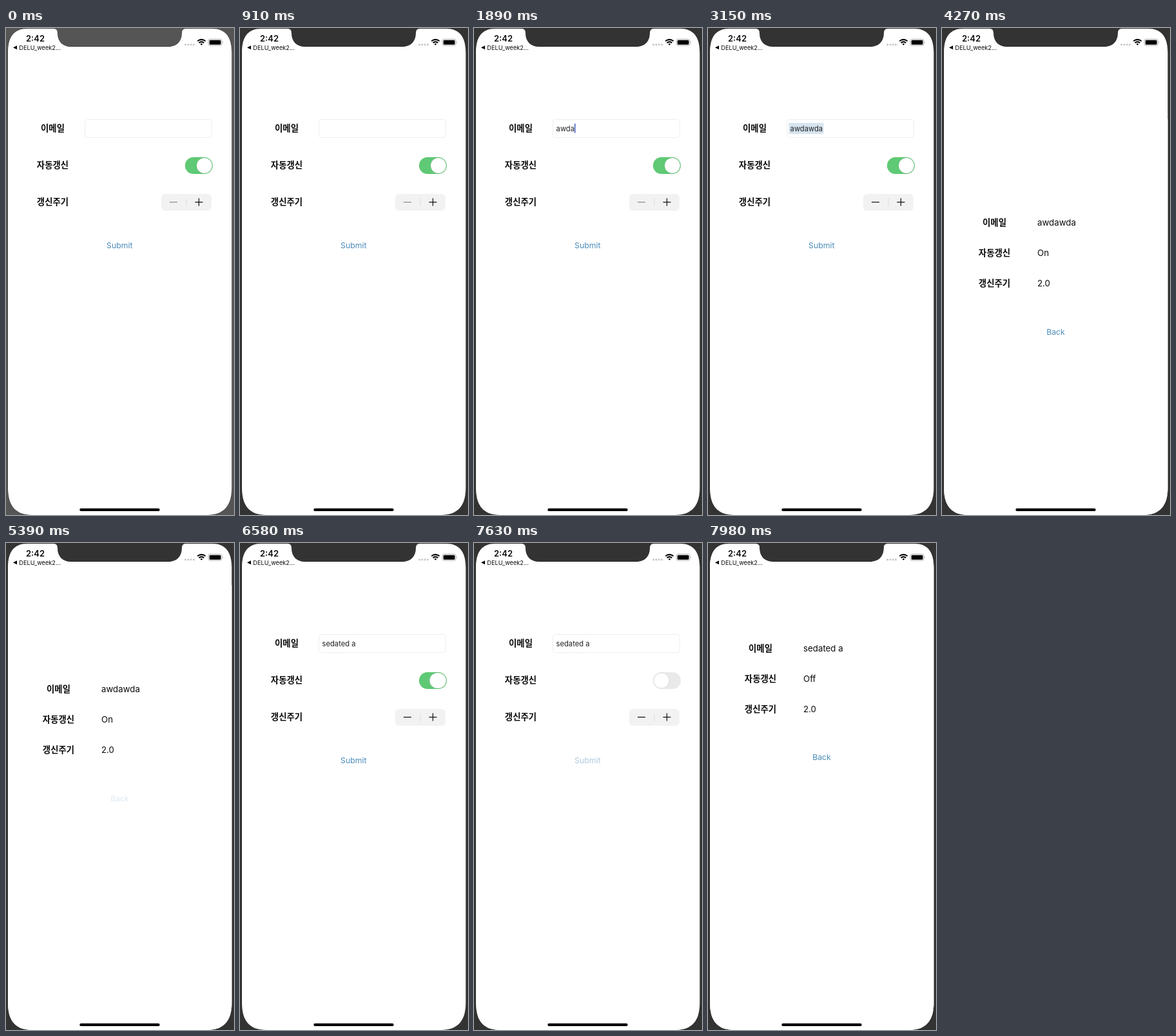
An HTML page that plays this animation: 354 px wide and 754 px high, repeating every 8 s.

```html
<!DOCTYPE html>
<html lang="ko">
<head>
<meta charset="utf-8">
<title>Settings form</title>
<style>
html, body { margin: 0; width: 100%; height: 100%; overflow: hidden; }
svg { display: block; width: 354px; height: 754px; }
text { font-family: Inter, Roboto, sans-serif; fill: #0c0c0c; }
.label { font: 700 13.4px "Noto Sans CJK KR", "Noto Sans CJK", "Noto Sans CJK JP", sans-serif; text-anchor: middle; }
.value { font-size: 13.3px; }
.field { font-size: 11.2px; fill: #222; }
.button { font-size: 12.3px; fill: #4c8cba; text-anchor: middle; }
.time { font-size: 13px; font-weight: 600; text-anchor: middle; }
.back-app { font-size: 9.2px; }
.sign { stroke: #111; stroke-width: 1.2; fill: none; }
</style>
</head>
<body>
<svg viewBox="0 0 354 754">
  <defs>
    <path id="screen" d="M3 38C3 14 12 1 33 1H74Q80 1 80 8C80 21 88 29 101 29H252C265 29 273 21 273 8Q273 1 279 1H320C341 1 350.5 14 350.5 38V712C350.5 740 338 754 312 754H41C15 754 3 740 3 712Z"/>
    <clipPath id="clip"><use href="#screen"/></clipPath>
  </defs>
  <rect id="desk" width="354" height="754"/>
  <use href="#screen" fill="#fff" stroke="#2b2b2b" stroke-width="1" paint-order="stroke"/>

  <g clip-path="url(#clip)">
    <g id="form">
      <text class="label" x="72.5" y="160">이메일</text>
      <text class="label" x="72.5" y="217">자동갱신</text>
      <text class="label" x="72.5" y="274">갱신주기</text>

      <rect x="122.5" y="141.5" width="197" height="28" rx="4" fill="#fff" stroke="#eee"/>
      <rect id="mark" x="125.5" y="147" width="54" height="17" fill="#d6e4ef"/>
      <text id="entry" class="field" x="127.6" y="159.8"></text>
      <rect id="caret" y="148" width="1.5" height="14.5" fill="#3f60c4"/>

      <rect id="track" x="278" y="200" width="43" height="26" rx="13"/>
      <rect id="knob" y="201" height="24" rx="12" fill="#fff" stroke="#000" stroke-opacity=".1"/>

      <rect x="241" y="257" width="78" height="26" rx="6" fill="#f2f2f3"/>
      <path id="press" d="M280 257H313Q319 257 319 263V277Q319 283 313 283H280Z" fill="#d4d4d7"/>
      <path d="M280 264V276" stroke="#dcdcdd"/>
      <path id="minus" class="sign" d="M254 269.6H266"/>
      <path class="sign" d="M293.5 269.6H305.5M299.5 263.6V275.6"/>
      <text id="submit" class="button" x="176.3" y="341">Submit</text>
    </g>

    <g id="modal">
      <rect width="354" height="760" fill="#fff"/>
      <text class="label" x="81.5" y="165.4">이메일</text>
      <text class="label" x="81.5" y="212.4">자동갱신</text>
      <text class="label" x="81.5" y="259.4">갱신주기</text>
      <text id="email" class="value" x="148" y="165.4"></text>
      <text id="auto" class="value" x="148" y="212.4"></text>
      <text class="value" x="148" y="259.4">2.0</text>
      <text id="back" class="button" x="176.5" y="334.2">Back</text>
    </g>
  </g>

  <text class="time" x="45.5" y="21">2:42</text>
  <path d="M11 30.3L17 27.3V33.3Z"/>
  <text class="back-app" x="20.3" y="33.5">DELU_week2...</text>
  <path d="M278.6 25.7H292" stroke="#c4c4c6" stroke-width="3" stroke-linecap="round" stroke-dasharray="0 4.3"/>
  <g fill="none" stroke="#000" stroke-width="2">
    <path d="M297.3 20.3Q303.5 15.4 309.7 20.3M299.6 23Q303.5 19.8 307.4 23"/>
    <path d="M303.5 26.8L301.6 24.7Q303.5 23.4 305.4 24.7Z" fill="#000" stroke="none"/>
  </g>
  <rect x="314.2" y="17.2" width="21" height="10" rx="2.8" fill="none" stroke="#aaa" stroke-width=".9"/>
  <rect x="315.8" y="18.7" width="17.8" height="7" rx="1.5"/>
  <path d="M336.4 20.4Q338 22.2 336.4 24Z" fill="#aaa"/>
  <rect x="114.3" y="743.8" width="124.4" height="4.2" rx="2.1"/>
</svg>

<script>
const $ = id => document.getElementById(id);
const set = (id, attrs) => {
  for (const k in attrs) $(id).setAttribute(k, attrs[k]);
};
const say = (id, text) => {
  if ($(id).textContent !== text) $(id).textContent = text;
};
const LOOP = 8000, STEP = 70, HEIGHT = 754;
const KEYS = [1400, 1610, 1680, 1890, 2030, 2170, 2380];
const TYPED = "awdawda", FIXED = "sedated a";

const ramp = (t, a, b) => Math.min(1, Math.max(0, (t - a) / (b - a)));
const ease = x => x * x * (3 - 2 * x);
const within = (t, a, b) => t >= a && t < b;
const mix = (a, b, k) => a.map((v, i) => Math.round(v + (b[i] - v) * k));

// Critically damped spring: share of the way still to go.
function spring(t, start) {
  const u = Math.max(0, t - start) * 0.0222;
  return (1 + u) * Math.exp(-u);
}

function modalTop(t) {
  if (t < 5368) return HEIGHT * spring(t, 4131);
  if (t < 7618) return HEIGHT * (1 - spring(t, 5368));
  return HEIGHT * spring(t, 7618);
}

// Buttons dim on touch and recover on release.
const dim = (t, down, up) =>
  t < down ? 1 : t < up ? 0.18 : 0.18 + 0.82 * ramp(t, up - 70, up + 140);

const tap = (t, down, up, end) => t < down ? 0 : 1 - ramp(t, up, end);

function drawField(t) {
  const fixed = t >= 4410;
  say("entry", fixed ? FIXED : TYPED.slice(0, KEYS.filter(k => t >= k).length));
  set("mark", { opacity: within(t, 2590, 4410) ? 1 : 0 });
  const lit = within(t, 1050, 2870) || within(t, 3430, 3990);
  const x = 127.6 + (t < KEYS[0] ? 0 : $("entry").getComputedTextLength());
  set("caret", { x: Math.min(x, 177.6), opacity: lit ? 1 : 0 });
}

function drawSwitch(t) {
  const slide = ease(ramp(t, 6650, 6930));
  const stretch = 5 * ramp(t, 6545, 6650) * (1 - ramp(t, 6790, 7000));
  const width = 24 + stretch;
  set("knob", { x: 279 + (41 - width) * (1 - slide), width });
  const color = mix([95, 201, 117], [233, 233, 234], slide);
  set("track", { fill: `rgb(${color})` });
}

function draw(t) {
  set("desk", { fill: t < 910 ? "#555" : "#333" });
  drawField(t);
  drawSwitch(t);

  const pressed = t < 3360 ? tap(t, 2800, 2870, 3150) : tap(t, 3360, 3400, 3570);
  set("press", { opacity: pressed });
  set("minus", { opacity: t < 2870 ? 0.45 : 1 });

  set("submit", { opacity: t < 7000 ? dim(t, 3990, 4130) : dim(t, 7490, 7630) });
  set("back", { opacity: t < 7000 ? dim(t, 5250, 5460) : 1 });

  set("modal", { transform: `translate(0 ${modalTop(t).toFixed(2)})` });
  const second = t > 7000;
  say("email", second ? FIXED : TYPED);
  say("auto", second ? "Off" : "On");
}

const begin = performance.now();
function tick() {
  const t = (performance.now() - begin) % LOOP;
  draw(Math.floor(t / STEP) * STEP);
  requestAnimationFrame(tick);
}
tick();
</script>
</body>
</html>
```
